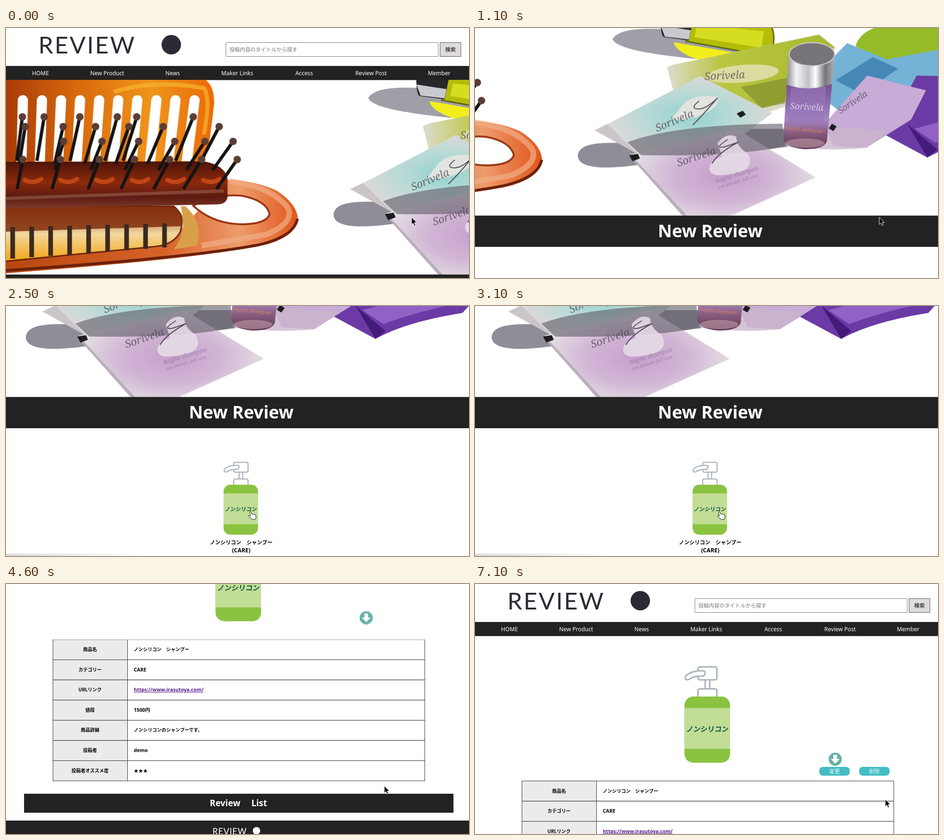
An HTML page that plays this animation: 1000x540 px, repeating every 7200 ms.

```html
<!DOCTYPE html>
<html lang="ja">
<head>
<meta charset="utf-8">
<title>Review</title>
<style>
  html, body { margin: 0; width: 100%; height: 100%; overflow: hidden; background: #fff; }
  svg { display: block; width: 100%; height: 100%; }
  text { font-family: "Noto Sans", "Noto Sans CJK JP", sans-serif; }
  .brand { font-family: Lato, sans-serif; }
  .jp { font-family: "Noto Sans CJK JP", sans-serif; }
  .mid { text-anchor: middle; }
  .bold { font-weight: 700; }
  .heading { font-weight: 600; fill: #fff; }
  .script text { font: italic 23px "Noto Serif", serif; fill: #4a4550; opacity: .75; }

  .anim { animation: 7.2s linear infinite; }
  #slides { animation: slide 3.7s ease -.794s both; }
  #home { animation-name: home-scroll; }
  #detail { animation-name: detail-show; animation-timing-function: step-end; }
  #page { animation-name: detail-scroll; }
  #product { animation-name: product-fade; }
  #buttons { animation-name: buttons-fade; }
  #status { animation-name: status-show; animation-timing-function: step-end; }
  #cursor { animation-name: cursor-move; animation-timing-function: ease-in-out; }
  #arrow { animation-name: arrow-show; animation-timing-function: step-end; }
  #hand { animation-name: hand-show; animation-timing-function: step-end; }

  @keyframes slide { from { transform: translateX(1000px); } to { transform: none; } }
  @keyframes home-scroll {
    0%, 11.11% { transform: none; animation-timing-function: ease-in-out; }
    20.83%, 100% { transform: translateY(-336px); }
  }
  @keyframes detail-show { 0% { visibility: hidden; } 44.44%, 100% { visibility: visible; } }
  @keyframes detail-scroll {
    0%, 54.16% { transform: none; animation-timing-function: ease-in-out; }
    61.11%, 63.89% { transform: translateY(-305.5px); animation-timing-function: ease-in-out; }
    66.66%, 100% { transform: none; }
  }
  @keyframes product-fade { 0%, 51.4% { opacity: 0; } 58.33%, 100% { opacity: 1; } }
  @keyframes buttons-fade { 0%, 77.78% { opacity: 0; } 83.33%, 100% { opacity: 1; } }
  @keyframes status-show { 0% { opacity: 0; } 31.94% { opacity: .7; } 54.16%, 100% { opacity: 0; } }
  @keyframes cursor-move {
    0%, 13.89% { transform: translate(876px, 409px); }
    22.22%, 23.62% { transform: translate(823px, 404px); }
    33.33%, 43.05% { transform: translate(526px, 444px); }
    50%, 66.66% { transform: translate(817px, 436px); }
    75%, 80.55% { transform: translate(779px, 378px); }
    90.27%, 100% { transform: translate(886px, 465px); }
  }
  @keyframes arrow-show {
    0% { opacity: 1; } 31.94% { opacity: 0; } 44.44% { opacity: 1; }
    73.61% { opacity: 0; } 83.33%, 100% { opacity: 1; }
  }
  @keyframes hand-show {
    0% { opacity: 0; } 31.94% { opacity: 1; } 44.44% { opacity: 0; }
    73.61% { opacity: 1; } 83.33%, 100% { opacity: 0; }
  }
</style>
</head>
<body>
<svg viewBox="0 0 1000 540">
  <defs>
    <clipPath id="photo"><rect y="112" width="1000" height="420.5"/></clipPath>
    <linearGradient id="amber">
      <stop stop-color="#a83a08"/><stop offset=".35" stop-color="#d96a0c"/>
      <stop offset=".7" stop-color="#f0951c"/><stop offset="1" stop-color="#ea6a08"/>
    </linearGradient>
    <linearGradient id="base" x2="0" y2="1">
      <stop stop-color="#4d1409"/><stop offset=".45" stop-color="#8c2a0c"/>
      <stop offset=".75" stop-color="#5c1a12"/><stop offset="1" stop-color="#7d3a2a"/>
    </linearGradient>
    <linearGradient id="handle">
      <stop stop-color="#b8470f"/><stop offset=".55" stop-color="#d8642a"/>
      <stop offset=".8" stop-color="#ee9c6c"/><stop offset="1" stop-color="#e0561a"/>
    </linearGradient>
    <linearGradient id="window" x2="0" y2="1">
      <stop stop-color="#8a2c08"/><stop offset=".5" stop-color="#f3d9a0"/><stop offset="1" stop-color="#f3a512"/>
    </linearGradient>
    <linearGradient id="silver">
      <stop stop-color="#8d8b92"/><stop offset=".2" stop-color="#f4f4f6"/><stop offset=".45" stop-color="#c2c0c8"/>
      <stop offset=".6" stop-color="#fff"/><stop offset=".8" stop-color="#77747c"/><stop offset="1" stop-color="#b5b3ba"/>
    </linearGradient>
    <linearGradient id="violet" x2="0" y2="1">
      <stop stop-color="#76508f"/><stop offset=".55" stop-color="#a486c2"/>
      <stop offset=".75" stop-color="#8a5c80"/><stop offset="1" stop-color="#5b3a55"/>
    </linearGradient>
    <radialGradient id="teal">
      <stop stop-color="#93d3cf"/><stop offset=".55" stop-color="#b9dad6"/><stop offset="1" stop-color="#dad9d8"/>
    </radialGradient>
    <radialGradient id="pink">
      <stop stop-color="#c59fcb"/><stop offset=".55" stop-color="#d2b6d6"/><stop offset="1" stop-color="#e2dde1"/>
    </radialGradient>
    <linearGradient id="lime">
      <stop stop-color="#d9d9b8"/><stop offset=".3" stop-color="#b9c640"/><stop offset="1" stop-color="#a9b932"/>
    </linearGradient>
    <linearGradient id="fade"><stop stop-color="#ccc"/><stop offset="1" stop-color="#ccc" stop-opacity="0"/></linearGradient>

    <g id="header">
      <rect width="1000" height="82" fill="#fff"/>
      <text class="brand" x="70" y="55" font-size="51" letter-spacing="3" fill="#2a2b36">REVIEW</text>
      <circle cx="357" cy="36" r="21" fill="#2a2b36"/>
      <rect x="475" y="31.5" width="458.5" height="30" rx="1" fill="#fff" stroke="#777"/>
      <text class="jp" x="482.5" y="50.5" font-size="11.3" fill="#757575">投稿内容のタイトルから探す</text>
      <rect x="937.5" y="31.5" width="45" height="30" fill="#dfdbdc" stroke="#555"/>
      <text class="jp mid" x="960" y="50.5" font-size="11.5" font-weight="500">検索</text>
      <rect y="82" width="1000" height="30.5" fill="#222"/>
      <g id="nav" class="mid" font-size="12.2" fill="#fff"></g>
    </g>

    <g id="pump">
      <g fill="#fff" stroke="#a8b0ba" stroke-width="3">
        <path d="M497 205V228M507 205V228"/>
        <rect x="481.5" y="179" width="41" height="28" rx="4"/>
        <path d="M495 188C478 186 462 191 455 199C451 206 458 209 464 205C472 199 482 199 492 199C497 198 498 189 495 188Z"/>
        <path d="M481.5 244V231Q481.5 226.5 486 226.5H518Q522.5 226.5 522.5 231V244"/>
      </g>
      <rect x="452.5" y="243" width="98.5" height="143" rx="19" fill="#8bc341"/>
      <rect x="452.5" y="268" width="98.5" height="88" fill="#c2dd95"/>
      <text class="jp mid" transform="translate(501.5 319) skewX(-8)" font-size="15.3" font-weight="900" fill="#0c5546">ノンシリコン</text>
    </g>
  </defs>

  <rect width="1000" height="540" fill="#fff"/>

  <g id="home" class="anim">
    <use href="#header"/>
    <g clip-path="url(#photo)">
      <g id="slides">
        <g transform="translate(-669)">
          <path d="M-5 112H428Q448 125 447 165L438 238Q432 275 420 300H-5Z" fill="url(#amber)"/>
          <path d="M230 138Q320 110 425 130Q440 150 425 230" fill="none" stroke="#f8b62c" stroke-width="9" opacity=".7"/>
          <g id="slots" stroke="#fff" stroke-width="22" stroke-linecap="round"></g>
          <path d="M-5 462L380 432L470 328Q530 328 580 350Q628 380 628 415Q622 450 560 468Q420 498 -5 530Z" fill="url(#handle)"/>
          <path d="M-5 524Q400 496 545 468Q620 450 627 412" fill="none" stroke="#6b200c" stroke-width="6"/>
          <path d="M480 331Q570 342 606 388Q622 420 560 446L420 470" fill="none" stroke="#f3ad85" stroke-width="12" opacity=".7"/>
          <path d="M402 384Q450 358 505 362Q560 372 567 402Q560 423 510 424Q445 424 402 384Z" fill="#fff" stroke="#9a3410" stroke-width="4"/>
          <path d="M-5 385H360Q385 405 374 440Q360 468 320 472L-5 504Z" fill="url(#window)" stroke="#6a2410" stroke-width="3"/>
          <path d="M385 385Q425 420 410 470L360 478Q390 440 375 385Z" fill="#d9a04a"/>
          <path d="M-5 388H362Q385 400 378 428L-5 440Z" fill="#84300f" opacity=".85"/>
          <path id="stubs" stroke="#3b2a20" stroke-width="10"/>
          <path d="M-5 289L425 288Q470 296 476 325V365Q474 380 455 381L-5 390Z" fill="url(#base)"/>
          <path id="glints" fill="none" stroke="#d4511a" stroke-width="9" stroke-linecap="round" opacity=".75"/>
          <path d="M-5 368L468 352" stroke="#8f5545" stroke-width="7" opacity=".7"/>
          <g id="bristles" stroke="#151313" stroke-width="7"></g>
        </g>

        <g transform="translate(-312)">
          <path d="M423 151C440 124 510 128 560 131L770 182L600 194C490 182 430 170 423 151Z" fill="#a09fa8"/>
          <path d="M555 158L720 186L610 196Q560 180 555 158Z" fill="#f2ee1c"/>
          <path d="M586 105L765 121Q776 145 768 174Q764 187 748 186L582 156Z" fill="#b3bd08" stroke="#5a6510" stroke-width="3"/>
          <path d="M606 120L750 134L745 170L600 147Z" fill="#d6dc20"/>
          <path d="M527 105H598L588 154L534 147Q526 142 527 105Z" fill="#28272a"/>
          <path d="M527 122L592 132L588 152L536 146Z" fill="#c9c9d0"/>

          <path d="M948 165Q960 130 1010 122H1180L1130 260L985 225Z" fill="#96bb28"/>
          <path d="M840 250L930 160L1015 195L1150 170L1180 290L930 320Z" fill="#74b3d6"/>
          <path d="M905 240L985 190L1040 215L960 270Z" fill="#4588b5"/>
          <path d="M1010 357L1080 230L1320 235L1310 330L1291 351Q1170 370 1103 407Z" fill="#6b3aa5"/>
          <path d="M1075 345L1310 280V325Q1200 345 1120 375Z" fill="#9161c6"/>
          <path d="M1060 335L1125 390L1103 407Z" fill="#431b78"/>
          <path d="M880 335L973 230L1100 262L1068 325L971 386L900 382Z" fill="#c8abd6"/>
          <path d="M775 380Q880 395 971 386L1020 350L900 340Z" fill="#cbb6cc" opacity=".8"/>

          <path d="M541 212L552 207L870 141L905 170L820 290L722 320L610 250L556 270Z" fill="#d9d9c6"/>
          <path d="M557 206L868 142L902 168L810 282L722 308L600 248L558 258Z" fill="url(#lime)"/>
          <ellipse cx="704" cy="226" rx="78" ry="19" fill="#dcdca0" transform="rotate(-5 704 226)"/>
          <path d="M700 255L800 235L795 290L745 300Z" fill="#75822a" opacity=".55"/>

          <path d="M348 402C352 374 400 374 460 376L600 345L800 345V384L590 410L470 424C400 433 347 430 348 402Z" fill="#8f8d98"/>
          <path d="M384 348L413 334L478 400Z" fill="#cbc4c8"/>
          <path d="M412 335L612 231L768 311L650 400H478Z" fill="url(#teal)"/>
          <path d="M575 292Q600 268 650 276Q655 300 615 315Q580 330 550 324Z" fill="#e1e4df"/>
          <path d="M458 402L480 408L610 545H585Z" fill="#b9aebb"/>
          <path d="M462 400L690 345L862 450L640 550H600Z" fill="url(#pink)"/>
          <path d="M455 374Q560 335 790 334L796 382Q700 405 485 402Z" fill="#605c68" opacity=".6"/>
          <path d="M650 376Q668 352 690 362Q692 385 715 398Q732 432 690 440Q630 455 632 428Q636 412 660 405Z" fill="#e8dfe8" opacity=".85"/>
          <g fill="#1e1c20">
            <path d="M459 402L478 399L482 409L466 415Z"/><path d="M691 312L704 306L711 314L699 321Z"/>
            <path d="M897 334L907 340L900 350L890 344Z"/>
          </g>

          <path d="M799 248H897L886 372Q880 389 838 389Q795 386 792 366Z" fill="url(#violet)"/>
          <path d="M808 256L884 254L880 330L803 332Z" fill="#9877bd" opacity=".6"/>
          <ellipse cx="839" cy="376" rx="42" ry="10" fill="#c49aa5" opacity=".6"/>
          <path d="M804 183L799 250Q848 266 897 248L903 183Z" fill="url(#silver)"/>
          <ellipse cx="853.5" cy="184" rx="49" ry="25" fill="#77747a" stroke="#cfcdd3" stroke-width="2"/>

          <g class="script">
            <text transform="translate(519 352) rotate(-23)">Sorivela</text>
            <text transform="translate(565 427) rotate(-19)">Sorivela</text>
            <text transform="translate(622 240) rotate(-3)">Sorivela</text>
            <text transform="translate(915 313) rotate(-34)" style="font-size:19px">Sorivela</text>
            <text transform="translate(806 302) rotate(3)" style="font-size:19px;fill:#f2e9f6">Sorivela</text>
            <text transform="translate(796 346) rotate(6)" style="font-size:11px;fill:#f08a4c">bagno shampoo</text>
            <text transform="translate(647 462) rotate(-17)" style="font-size:13px;fill:#92729a">bagno shampoo</text>
            <text transform="translate(652 475) rotate(-17)" style="font-size:9.5px;fill:#92729a">con estratti dell' uva</text>
            <path d="M610 285Q590 300 606 302Q624 304 650 278Q612 322 596 337M672 368Q640 388 665 384L694 374Q650 398 638 420" fill="none" stroke="#514a58" stroke-width="2"/>
          </g>
        </g>
      </g>
    </g>
    <rect y="532.5" width="1000" height="67.5" fill="#222"/>
    <text class="heading mid" x="508" y="579" font-size="37.5">New Review</text>
    <use href="#pump" transform="translate(128.3 538.5) scale(.755)"/>
    <text class="jp mid bold" x="508" y="850.5" font-size="11.3">ノンシリコン　シャンプー</text>
    <text class="mid bold" x="508" y="867.5" font-size="12.3">(CARE)</text>
  </g>

  <g id="detail" class="anim">
    <rect width="1000" height="540" fill="#fff"/>
    <g id="page" class="anim">
      <use href="#header"/>
      <g id="product" class="anim"><use href="#pump"/></g>
      <circle cx="778" cy="378.5" r="14.2" fill="#66b2a9"/>
      <path d="M774 369H782V378H787.5L778 388L768.5 378H774Z" fill="#fff"/>
      <g id="buttons" class="anim mid" font-size="11.5">
        <rect x="743.5" y="395" width="66" height="19" rx="8" fill="#45bec3"/>
        <rect x="829.5" y="395" width="66" height="19" rx="8" fill="#45bec3"/>
        <text class="jp" x="776.5" y="408.8" fill="#eafafa">変更</text>
        <text class="jp" x="862.5" y="408.8" fill="#eafafa">削除</text>
      </g>
      <g id="table" class="bold"></g>
      <rect x="39" y="758.5" width="927.5" height="41" fill="#222"/>
      <text class="heading" x="440" y="785.5" font-size="18.8">Review</text>
      <text class="heading" x="530" y="785.5" font-size="18.8">List</text>
      <rect y="816.5" width="1000" height="40" fill="#222"/>
      <text class="brand" x="446" y="846" font-size="18.5" letter-spacing=".7" fill="#fff">REVIEW</text>
      <circle cx="541" cy="838.5" r="8" fill="#fff"/>
    </g>
  </g>

  <rect id="status" class="anim" y="535" width="300" height="5" fill="url(#fade)"/>
  <g id="cursor" class="anim" stroke-linejoin="round">
    <path id="arrow" class="anim" d="M0 0V15.5L3.5 12.3L6 18L8.6 16.9L6.2 11.3H11Z" stroke="#fff"/>
    <path id="hand" class="anim" d="M0 1Q2-1 3.2 1.5L5 6Q7 4.5 8 6Q10 5 11 6.5Q13 6 13.5 8L14 13L12 17H6L-2 10.5Q-3 8 0 8.5L2 9.5Z" fill="#fff" stroke="#111"/>
  </g>
</svg>
<script>
  const $ = id => document.getElementById(id);

  const navItems = [['HOME', 74.5], ['New Product', 218.5], ['News', 360], ['Maker Links', 499.5],
    ['Access', 644], ['Review Post', 788.5], ['Member', 935.5]];
  $('nav').innerHTML = navItems.map(([label, x]) => `<text x="${x}" y="101.5">${label}</text>`).join('');

  const rows = [['商品名', 'ノンシリコン　シャンプー'], ['カテゴリー', 'CARE'],
    ['URLリンク', 'https://www.irasutoya.com/'], ['値段', '1500円'],
    ['商品詳細', 'ノンシリコンのシャンプーです。'], ['投稿者', 'demo'], ['投稿者オススメ度', '★★★']];
  const rowHeight = 43.6;
  $('table').innerHTML = rows.map(([label, value], i) => {
    const y = 425.5 + i * rowHeight;
    const fontSize = value.charCodeAt(0) < 128 ? 10.7 : 10;
    const link = value.startsWith('http') ? 'fill="#551a8b" text-decoration="underline"' : '';
    return `<rect x="101.5" y="${y}" width="161" height="${rowHeight}" fill="#ebebeb" stroke="#333"/>
      <rect x="262.5" y="${y}" width="642" height="${rowHeight}" fill="#fff" stroke="#333"/>
      <text class="jp mid" x="181.5" y="${y + 25}" font-size="10">${label}</text>
      <text x="276" y="${y + 25}" font-size="${fontSize}" ${link}>${value}</text>`;
  }).join('');

  const series = (n, f) => Array.from({ length: n }, (_, i) => f(i)).join('');
  $('slots').innerHTML = series(10, i => {
    const x = 34 + 41.2 * i;
    return `<path d="M${x} 156L${x * 0.96 - 2} 300"/>`;
  });
  $('stubs').setAttribute('d', series(9, i => `M${12 + i * 41} ${430 - i}V${498 - i * 3}`));
  $('glints').setAttribute('d', series(6, i => `M${38 + i * 77} 328q18 10 36 -2`));

  // Each row: head height, stem length, head positions
  const bristleRows = [
    [192, 95, [33, 80, 157, 238, 280, 402]],
    [213, 80, [39, 121, 191, 263, 337, 458]],
    [245, 62, [122, 205, 284, 362, 427, 488]],
    [284, 64, [34, 115, 199, 275, 351, 420, 497]]
  ];
  $('bristles').innerHTML = bristleRows.map(([y, length, heads]) => heads.map(x =>
    `<path d="M${x} ${y}l${-10 - x * 0.07} ${length}"/>
     <circle cx="${x}" cy="${y}" r="8" fill="#5b3d36" stroke="none"/>`).join('')).join('');

  // Advance every keyframe animation in 100 ms steps
  const LOOP = 7200, STEP = 100;
  const animations = document.getAnimations();
  animations.forEach(a => a.pause());
  const start = performance.now();
  function tick() {
    const elapsed = Math.max(0, performance.now() - start) % LOOP;
    const time = Math.floor(elapsed / STEP) * STEP;
    animations.forEach(a => { a.currentTime = time; });
    requestAnimationFrame(tick);
  }
  tick();
</script>
</body>
</html>
```
